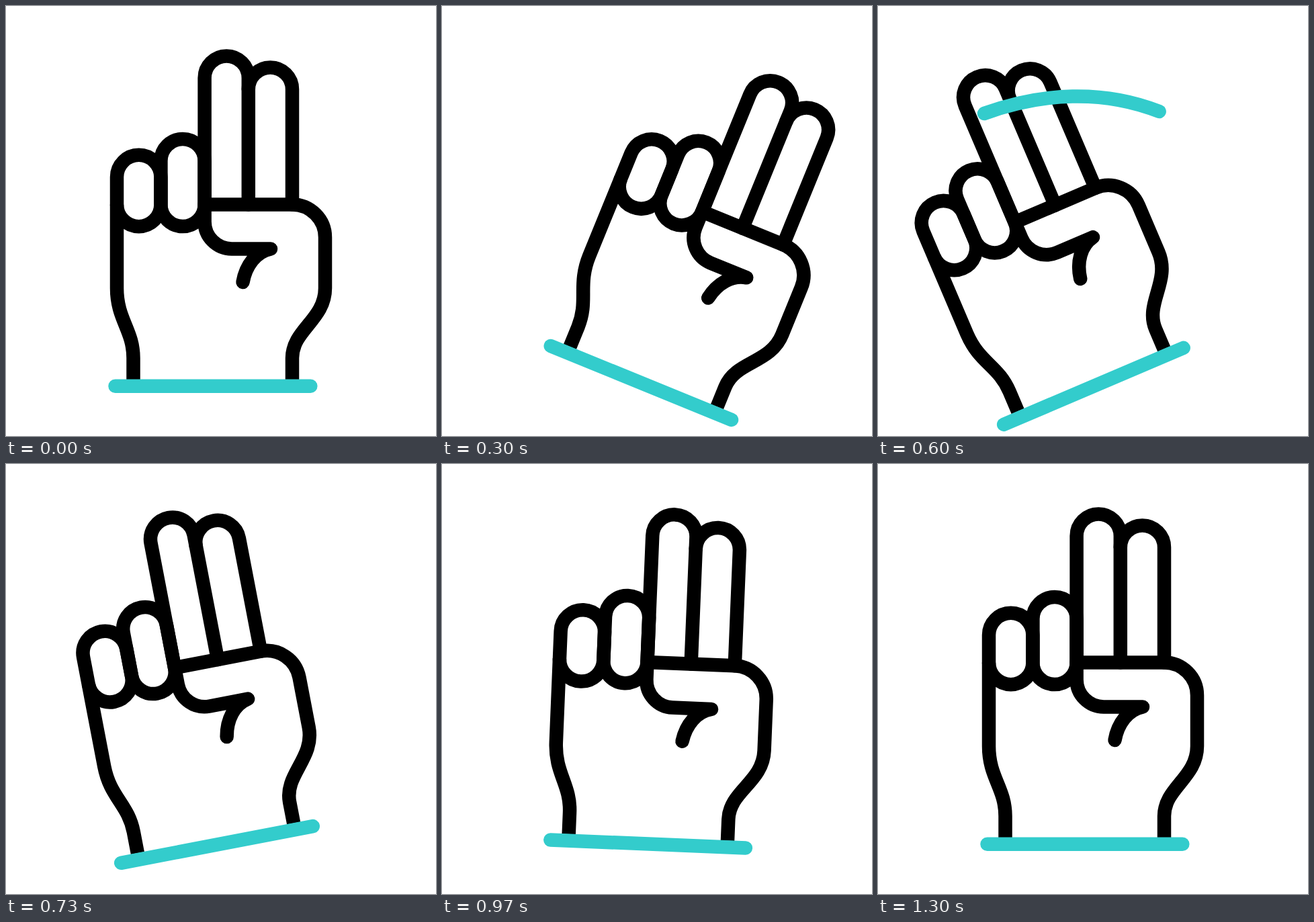
Recreate the animation shown at these times as an HTML page. Size 640 px wide and 640 px high, loop 1.67 s.

```html
<!DOCTYPE html>
<html lang="en">
<head>
<meta charset="utf-8">
<title>Hand sign</title>
<style>
  html, body { margin: 0; width: 100%; height: 100%; overflow: hidden; background: #fff; }
  svg { display: block; width: 100%; height: 100%; }
  path { fill: none; stroke-width: 20.5; stroke-linejoin: round; }
  .ink { stroke: #000; }
  .teal { stroke: #3cc; stroke-linecap: round; }
  .round { stroke-linecap: round; }
</style>
</head>
<body>
<svg viewBox="0 0 640 640">
  <g id="hand">
    <!-- wrist and fist -->
    <path class="ink" d="M165 295.5V420C165 467 189.5 482 189.5 524V556"/>
    <path class="ink" d="M295.5 295.5H426A49 49 0 0 1 475 344.5V420C475 467 426 482 426 524V556"/>
    <!-- folded fingers -->
    <path class="ink" d="M165 295.5V254.5a32.7 32.7 0 0 1 65.4 0V295.5a32.7 32.7 0 0 1 -65.4 0Z"/>
    <path class="ink" d="M230.4 295.5V230.5a32.6 32.6 0 0 1 65.2 0V295.5a32.6 32.6 0 0 1 -65.2 0Z"/>
    <!-- raised fingers -->
    <path class="ink round" d="M295.6 295.5V107a32.6 32.6 0 0 1 65.2 0V295.5"/>
    <path class="ink round" d="M360.8 124a32.6 32.6 0 0 1 65.2 0V295.5"/>
    <!-- thumb -->
    <path class="ink round" d="M295.6 295.5V321A40.5 40.5 0 0 0 336 361.5H394C372 366 357 386 352.5 411"/>
    <path class="teal" d="M162.5 565.8H453.3"/>
  </g>
  <path id="swish" class="teal" d="M543 242C432.6 126.8 289.6 112.4 158 160"/>
</svg>
<script>
const LOOP = 1670, FPS = 30;
const hand = document.getElementById('hand');
const swish = document.getElementById('swish');
const len = swish.getTotalLength();

// [frame, degrees]: a wide swing that settles
const swing = [[2, 0], [11.9, 28], [19, -26], [25.45, 7.85], [32.8, -3.7], [39, 0]];

function ease(t, from, to) {
  const p = Math.min(1, Math.max(0, (t - from) / (to - from)));
  return p * p * (3 - 2 * p);
}

function angleAt(f) {
  let a = swing[0][1];
  for (let i = 1; i < swing.length; i++) {
    const [t0, a0] = swing[i - 1], [t1, a1] = swing[i];
    a += (a1 - a0) * ease(f, t0, t1);
  }
  return a;
}

function draw(ms) {
  const f = Math.floor((ms % LOOP + 5) * FPS / 1000);
  hand.setAttribute('transform', `rotate(${angleAt(f).toFixed(3)} 314.5 534)`);

  const head = ease(f, 10.55, 15.95) * len;
  const tail = ease(f, 15.8, 21.2) * len;
  const shown = head - tail;
  swish.style.display = shown > 0.5 ? '' : 'none';
  swish.setAttribute('stroke-dasharray', `${shown} ${len * 2}`);
  swish.setAttribute('stroke-dashoffset', -tail);
}

const start = performance.now();
function tick() {
  draw(performance.now() - start);
  requestAnimationFrame(tick);
}
tick();
</script>
</body>
</html>
```
